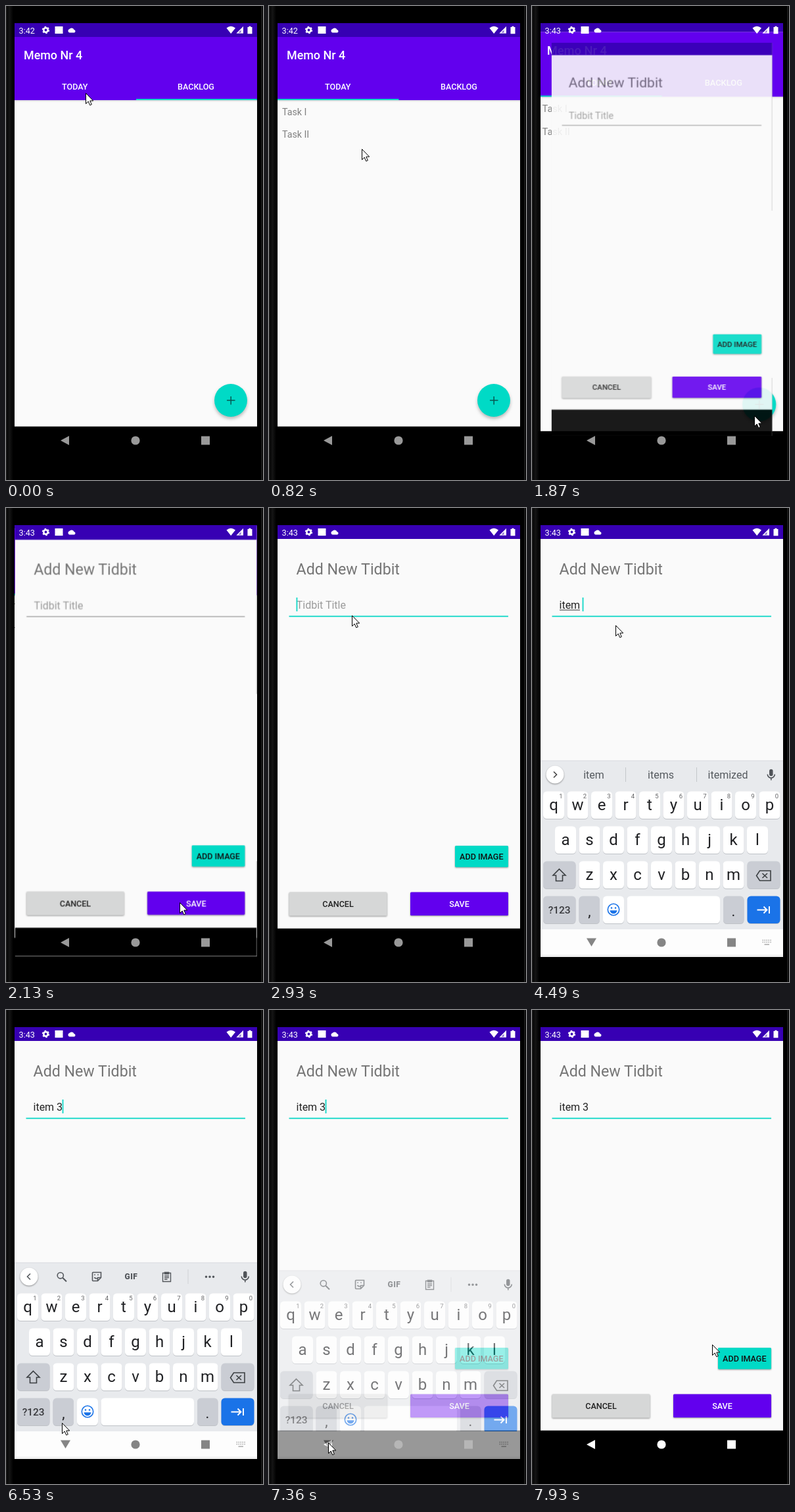
An HTML page for the animation above (8 s loop, 391 by 720 pixels).

```html
<!DOCTYPE html>
<html lang="en">
<head>
<meta charset="utf-8">
<title>Task list app</title>
<style>
html, body { margin: 0; width: 100%; height: 100%; overflow: hidden; background: #000; }
svg { display: block; }
text { font-family: Roboto, sans-serif; white-space: pre; }
.medium { font-weight: 500; }
.mid { text-anchor: middle; }
.button { font-size: 12.56px; font-weight: 500; text-anchor: middle; }
.field { font-size: 16px; }
.shadow { filter: drop-shadow(0 1px 1px #0006); }
.anim, .anim * { animation: 8s step-end infinite; }
#main, #editor { transform-origin: 197.5px 354px; }

/* 1% = 80 ms */
#mouse { animation-name: mouse; }
@keyframes mouse {
  0% { transform: translate(121px, 132px); }
  6.5% { transform: translate(122px, 136px); }
  8.125% { transform: translate(129px, 163px); }
  10.25% { transform: translate(141px, 217px); }
  11.75% { transform: translate(198px, 365px); }
  13.25% { transform: translate(268px, 515px); }
  15% { transform: translate(322px, 585px); }
  16.625% { transform: translate(339px, 600px); }
  23.25% { transform: translate(338px, 622px); }
  25% { transform: translate(312px, 643px); }
  26.625% { transform: translate(264px, 599px); }
  28.5% { transform: translate(236px, 530px); }
  30.125% { transform: translate(188px, 365px); }
  31.75% { transform: translate(145px, 215px); }
  33.375% { transform: translate(126px, 158px); }
  35% { transform: translate(125px, 151px); }
  36.625% { transform: translate(126px, 163px); }
  38.25% { transform: translate(127px, 178px); }
  76.875% { transform: translate(148px, 235px); }
  78.5% { transform: translate(163px, 390px); }
  80.125% { transform: translate(122px, 550px); }
  81.625% { transform: translate(85px, 627px); }
  83.125% { transform: translate(86px, 643px); }
  84.875% { transform: translate(89px, 654px); }
  86.625% { transform: translate(90px, 657px); }
  93.75% { transform: translate(108px, 645px); }
  95.5% { transform: translate(168px, 592px); }
  97.375% { transform: translate(238px, 532px); }
  99.125% { transform: translate(274px, 508px); }
}
#today { animation-name: page; }
@keyframes page {
  0% { transform: translateX(-369px); }
  3.125% { transform: translateX(-215px); }
  4.875% { transform: translateX(-30px); }
  6.5%, 100% { transform: none; }
}
#indicator { animation-name: indicator; }
@keyframes indicator {
  0% { transform: translateX(184.5px); }
  3.125% { transform: translateX(107px); }
  4.875% { transform: translateX(15px); }
  6.5%, 100% { transform: none; }
}
#tabRipple { animation-name: tabRipple; }
@keyframes tabRipple { 0% { opacity: 0; } 1.5% { opacity: .12; } 4.875% { opacity: .06; } 6.5%, 100% { opacity: 0; } }
#fabRipple { animation-name: fabRipple; }
@keyframes fabRipple { 0% { opacity: 0; } 18.25% { opacity: .2; } 21.625%, 100% { opacity: 0; } }

/* The old window grows behind while the new one fades and scales in. */
#main { animation-name: leave; }
@keyframes leave {
  0% { transform: none; }
  23.25% { transform: scale(1.025); }
  25% { transform: scale(1.045); }
  26.625% { transform: scale(1.05); }
  28.5%, 100% { visibility: hidden; }
}
#editor { animation-name: enter; }
@keyframes enter {
  0% { opacity: 0; }
  23.25% { opacity: .9; transform: scale(.91); }
  25% { opacity: 1; transform: scale(.983); }
  26.625% { opacity: 1; transform: scale(.996); }
  28.5%, 100% { opacity: 1; transform: none; }
}
#before { animation-name: before; }
#after { animation-name: after; }
@keyframes before { 0% { opacity: 1; } 21.625%, 100% { opacity: 0; } }
@keyframes after { 0% { opacity: 0; } 21.625%, 100% { opacity: 1; } }
#line { animation-name: focus; }
@keyframes focus {
  0% { fill: #808080; height: 1px; }
  35%, 100% { fill: #00d5c4; height: 1.7px; }
}
#hint { animation-name: hint; }
@keyframes hint { 0% { opacity: 1; } 51.125%, 100% { opacity: 0; } }
#typed { animation-name: typed; }
@keyframes typed {
  0% { width: 0; }
  51.125% { width: 4.5px; }
  53.125% { width: 18.5px; }
  54.625% { width: 32px; }
  56.125% { width: 35px; }
  65%, 100% { width: 60px; }
}
#compose { animation-name: compose; }
@keyframes compose { 0% { opacity: 1; } 57.625%, 100% { opacity: 0; } }
#caret { animation-name: caret; }
@keyframes caret {
  0% { transform: translateX(-9px); }
  35% { transform: translateX(41.5px); }
  51.125% { transform: translateX(44.7px); }
  53.125% { transform: translateX(59px); }
  54.625% { transform: translateX(72.5px); }
  56.125% { transform: translateX(76.6px); }
  65%, 100% { transform: translateX(85.6px); }
}
#blink { animation-name: blink; }
@keyframes blink {
  0% { opacity: 0; }
  35% { opacity: 1; }
  71.5% { opacity: 0; }
  78.5% { opacity: 1; }
  84.875% { opacity: 0; }
  90.25% { opacity: 1; }
  97.375%, 100% { opacity: 0; }
}
#ime { animation-name: ime; }
@keyframes ime {
  0% { opacity: 0; }
  53.125% { opacity: .8; }
  54.625% { opacity: 1; }
  92% { opacity: .6; }
  93.75%, 100% { opacity: 0; }
}
#keyboard { animation-name: keyboard; }
@keyframes keyboard {
  0% { transform: translateY(30px); }
  53.125% { transform: translateY(8px); }
  54.625% { transform: none; }
  92%, 100% { transform: translateY(12px); }
}
#suggest { animation-name: suggest; }
#tools { animation-name: tools; }
@keyframes suggest { 0% { opacity: 1; } 65%, 100% { opacity: 0; } }
@keyframes tools { 0% { opacity: 0; } 65%, 100% { opacity: 1; } }
#nav { animation-name: nav; }
@keyframes nav { 0% { fill: #999; } 92%, 100% { fill: #fff; } }
</style>
</head>
<body>
<svg class="anim" width="391" height="720" viewBox="0 0 391 720">
  <defs>
    <clipPath id="display"><rect x="13" y="26" width="369" height="656"/></clipPath>
    <clipPath id="typedClip"><rect id="typed" x="41" y="130" width="0" height="30"/></clipPath>
    <linearGradient id="edge">
      <stop offset="0" stop-color="#242424"/><stop offset=".2" stop-color="#050505"/>
      <stop offset=".45" stop-color="#161616"/><stop offset="1" stop-color="#000"/>
    </linearGradient>
    <linearGradient id="fade" x2="0" y2="1">
      <stop stop-color="#0002"/><stop offset="1" stop-color="#0000"/>
    </linearGradient>
  </defs>
  <rect width="391" height="720"/>
  <rect width="11" height="720" fill="url(#edge)"/>
  <rect x="388" width="2" height="720" fill="#181818"/>

  <g clip-path="url(#display)">
    <g id="main">
      <rect x="13" y="26" width="369" height="656"/>
      <rect x="13" y="26" width="369" height="612.700" fill="#fafafa"/>
      <g id="today" font-size="14.2" fill="#808080">
        <text x="20" y="165.500">Task I</text><text x="20" y="199.500">Task II</text>
      </g>
      <rect x="13" y="143" width="369" height="3" fill="url(#fade)"/>
      <rect x="13" y="47" width="369" height="96" fill="#6200ee"/>
      <rect x="13" y="26" width="369" height="21" fill="#3700b3"/>
      <text class="medium" x="27" y="80.500" font-size="17.9" fill="#fff">Memo Nr 4</text>
      <rect id="tabRipple" x="13" y="100" width="184.500" height="43" fill="#fff" opacity="0"/>
      <g fill="#fff">
        <text class="button" x="104.700" y="126.500">TODAY</text>
        <text class="button" x="289" y="126.500">BACKLOG</text>
      </g>
      <rect id="indicator" x="13" y="141" width="184.500" height="2" fill="#03dac5"/>
      <circle cx="342" cy="599" r="25" fill="#00dac6" style="filter:drop-shadow(0 3px 2.5px #0004)"/>
      <circle id="fabRipple" cx="342" cy="599" r="25" fill="#fff" opacity="0"/>
      <path d="M336 599h12.500M342.200 593v12.500" stroke="#075a53" stroke-width="1.500"/>
    </g>

    <g id="editor">
      <rect x="13" y="26" width="369" height="656"/>
      <rect x="13" y="26" width="369" height="612.700" fill="#fafafa"/>
      <rect x="13" y="26" width="369" height="21" fill="#3700b3"/>
      <text x="41.500" y="100.500" font-size="23.2" fill="#757575">Add New Tidbit</text>
      <text id="hint" class="field" x="41.700" y="153.300" fill="#9b9b9b">Tidbit Title</text>
      <rect id="line" x="30.500" y="163.700" width="333.500" height="1"/>
      <g clip-path="url(#typedClip)">
        <text class="field" x="41.500" y="153" fill="#222">item 3</text>
        <rect id="compose" x="42" y="154.500" width="31" height="1" fill="#333"/>
      </g>
      <g id="blink"><rect id="caret" y="136" width="1.700" height="21" fill="#00d5c4"/></g>
      <g class="shadow">
        <rect x="283" y="513" width="81" height="32.500" rx="1.500" fill="#00dac6"/>
        <rect x="30.500" y="583.500" width="149" height="36" rx="1.500" fill="#d6d7d7"/>
        <rect x="215" y="583.500" width="149" height="35.500" rx="1.500" fill="#6200ee"/>
      </g>
      <text class="button" x="323.300" y="534" fill="#111">ADD IMAGE</text>
      <text class="button" x="105" y="606" fill="#222">CANCEL</text>
      <text class="button" x="289.500" y="606" fill="#fff">SAVE</text>
    </g>
  </g>

  <g id="nav">
    <path d="M83 660L96 653V667Z"/><circle cx="197" cy="660" r="6.600"/>
    <rect x="297" y="653.500" width="13" height="13"/>
  </g>

  <g fill="#fff">
    <text id="before" x="19.500" y="41.500" font-size="12.7">3:42</text>
    <text id="after" x="19.500" y="41.500" font-size="12.7">3:43</text>
    <circle cx="60.500" cy="36.500" r="3.200" fill="none" stroke="#fff" stroke-width="2.600"/>
    <circle cx="60.500" cy="36.500" r="4.900" fill="none" stroke="#fff" stroke-width="1.600" stroke-dasharray="2.600 2.531"/>
    <rect x="74.500" y="31" width="12" height="11"/>
    <path d="M96.500 40.500a2.800 2.800 0 0 1 0-5.400a4 4 0 0 1 7 .8a2.400 2.400 0 0 1 .5 4.600Z"/>
    <path d="M335.500 33.500Q342 28 349 33.500L342.200 42Z"/>
    <path d="M361 31V41.500H350.500Z" opacity=".4"/>
    <path d="M361 31V41.500H350.500ZM359.800 34L353.500 40.500H357.500V36.500Z" fill-rule="evenodd"/>
    <path d="M367.500 32h2v-1.300h3V32h2v10.200h-7Z"/>
  </g>

  <g id="ime" clip-path="url(#display)">
    <g id="keyboard">
      <rect x="13" y="383.500" width="369" height="257" fill="#e8eaed"/>
      <rect x="13" y="383.500" width="369" height="1" fill="#dcdee1"/>
      <circle cx="35" cy="405" r="13.500" fill="#fff" class="shadow"/>
      <g id="suggest" fill="#555a5f" font-size="16">
        <path d="M33 400.500L37.500 405L33 409.500" fill="none" stroke="#444" stroke-width="1.600"/>
        <text class="mid" x="94" y="411">item</text>
        <text class="mid" x="196" y="411">items</text>
        <text class="mid" x="298" y="411">itemized</text>
        <path d="M142.500 394v22M250.500 394v22" stroke="#c4c7ca"/>
      </g>
      <g id="tools" fill="none" stroke="#54585d" stroke-width="1.600">
        <path d="M37 400.500L32.500 405L37 409.500"/>
        <circle cx="82.800" cy="403.300" r="4.600"/><path d="M86.200 406.800L92 412.500" stroke-width="2"/>
        <path d="M132.500 398.500H144.500V406.500L139.500 411.500H132.500Q131.500 411.500 131.500 410.500V399.500Q131.500 398.500 132.500 398.500ZM139.500 411V406.500H144M134.500 406Q136 408.500 138.500 407.500M135 401.500v1.500M140 401.500v1.500"/>
        <text class="mid" x="190.500" y="409.300" font-size="12" font-weight="900" letter-spacing=".5" fill="#54585d" stroke="none">GIF</text>
        <path d="M238.500 399.500H250.500V412.500H238.500ZM241.500 398.500H247.500V401H241.500ZM241 404h7M241 406.500h7M241 409h4.500" stroke-width="1.400"/>
        <path d="M277 394v22" stroke="#cfd2d5" stroke-width="1"/>
        <path d="M304.500 405.300h.01M310 405.300h.01M315.500 405.300h.01" stroke-width="3.600" stroke-linecap="round"/>
      </g>
      <g fill="none" stroke="#505459" stroke-width="1.600">
        <path d="M363.800 399.500V404.500" stroke-width="5.500" stroke-linecap="round"/>
        <path d="M358.300 404.500a5.500 5.500 0 0 0 11 0M363.800 410V413.500"/>
      </g>
      <g id="keys"></g>
      <g fill="none" stroke="#3c4043" stroke-width="1.600">
        <path d="M41.500 548.500L51 558H46.500V566.500H36.500V558H32Z"/>
        <path d="M346.500 551H363V566H346.500L341.500 558.500ZM350.500 555L358 562M358 555L350.500 562"/>
        <g stroke="#1a73e8">
          <circle cx="124" cy="610" r="8.700"/><path d="M119.500 612a4.700 4.700 0 0 0 9 0Z" fill="#1a73e8"/>
          <path d="M121 607.500h.01M127 607.500h.01" stroke-width="2.600" stroke-linecap="round"/>
        </g>
        <path d="M342.500 610.500H357M352.500 605.500L357.500 610.500L352.500 615.500M361 605V616" stroke="#fff" stroke-width="1.900"/>
      </g>
    </g>
    <rect x="13" y="640" width="369" height="42" fill="#fdfdfd"/>
    <rect x="13" y="678.500" width="369" height="3.500" fill="#f1f1f1"/>
    <g fill="#858585">
      <path d="M83 653.500H98L90.500 666Z"/><circle cx="197" cy="660" r="6.600"/>
      <rect x="297" y="653.500" width="13" height="13"/>
    </g>
    <path d="M350.500 656.500H364M350.500 659.500H364" stroke="#aaa" stroke-width="1.600" stroke-dasharray="1.600 1.350"/>
    <path d="M353.500 663H361" stroke="#aaa" stroke-width="1.500"/>
  </g>

  <g id="mouse"><path d="M.5.500V16.500L4.200 13L6.700 18.700L9.300 17.600L6.800 12H11.700Z" fill="#fff" stroke="#000"/></g>
</svg>
<script>
const GREY = '#cacdd4', STEP = 36.5;
const key = (x, y, width, fill = '#fff') =>
  `<rect x="${x}" y="${y + 1}" width="${width}" height="41.5" rx="5.5" fill="#bfc2c7"/>
   <rect x="${x}" y="${y}" width="${width}" height="41.5" rx="5.5" fill="${fill}"/>`;
const label = (x, y, value, size, extra = '') =>
  `<text x="${x}" y="${y}" text-anchor="middle" font-size="${size}" fill="#202124" ${extra}>${value}</text>`;

const letterRow = (letters, firstX, y, numbered) => [...letters].map((letter, i) => {
  const x = firstX + i * STEP;
  const digit = numbered ? label(x + 11, y + 10.3, (i + 1) % 10, 9.5, 'opacity=".7"') : '';
  return key(x - 16, y, 32) + label(x, y + 28, letter, 24) + digit;
}).join('');

document.getElementById('keys').innerHTML =
  letterRow('qwertyuiop', 33, 430.5, true) +
  letterRow('asdfghjkl', 51, 483.5) +
  letterRow('zxcvbnm', 87.5, 536.5) +
  key(17, 536.5, 49.5, GREY) + key(327.5, 536.5, 50, GREY) +
  key(17, 589.5, 49.5, GREY) + label(41.7, 616, '?123', 15.5, 'class="medium" opacity=".85"') +
  key(71.5, 589.5, 31.5, GREY) + label(87.5, 620, ',', 22) +
  key(108, 589.5, 32) + key(144.5, 589.5, 141.5) +
  key(291, 589.5, 31.5, GREY) + label(306.5, 620, '.', 22) +
  key(327.5, 589.5, 50, '#1a73e8');
</script>
</body>
</html>
```
